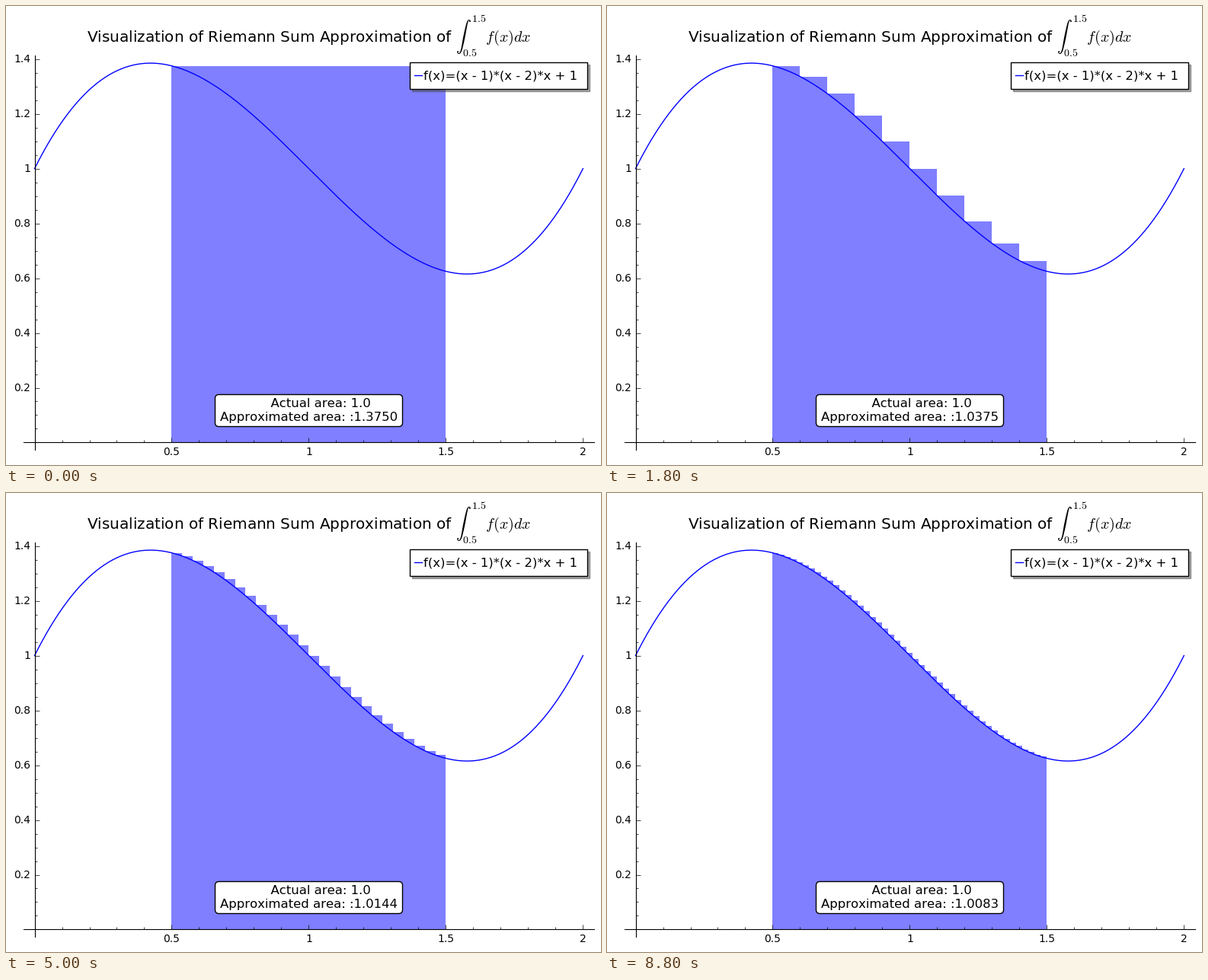
These frames come from a looping animation (781x603 px, 9 s). A matplotlib script:

```python
import numpy as np
import matplotlib.pyplot as plt
from matplotlib.animation import FuncAnimation
from matplotlib.markers import TICKRIGHT, TICKUP
from matplotlib.patches import FancyBboxPatch, Rectangle, Shadow

W, H, DPI = 781, 603, 100
X0, Y0, UNIT = 37.525, 573.483, 359.9  # origin in pixels, pixels per unit
LEFT, RIGHT = 0.5, 1.5
STEPS, INTERVAL = 45, 200
TITLE_SIZE, TEXT_SIZE, TICK_SIZE = 14.4, 11.87, 10
TICK_PAD = 5.56

plt.rcParams.update({
    "font.family": "DejaVu Sans",
    "mathtext.fontset": "cm",
    "text.kerning_factor": 6,
})


def f(x):
    return (x - 1) * (x - 2) * x + 1


def at(px, py):
    """Data coordinates of a pixel counted from the top left."""
    return (px - X0) / UNIT, (Y0 - py) / UNIT


def label(px, py, text, size, **kw):
    kw.setdefault("va", "baseline")
    return ax.text(*at(px, py), text, fontsize=size, **kw)


def ticks(xs, ys, marker, size):
    ax.plot(xs, ys, ls="none", marker=marker, ms=size, mew=0.5,
            color="black", zorder=3)


def riemann(n):
    """Left-hand heights, bar edges and total area for n bars."""
    edges = np.linspace(LEFT, RIGHT, n + 1)
    heights = f(edges[:-1])
    return heights, edges, heights.mean() * (RIGHT - LEFT)


def area_text(area):
    return f"      Actual area: 1.0\nApproximated area: :{area:.4f}"


fig = plt.figure(figsize=(W / DPI, H / DPI), dpi=DPI, facecolor="white")
ax = fig.add_axes([0, 0, 1, 1])
ax.axis("off")
(x_min, y_max), (x_max, y_min) = at(0, 0), at(W, H)
ax.set(xlim=(x_min, x_max), ylim=(y_min, y_max))
ax.set_autoscale_on(False)

# Bars and curve
heights, edges, area = riemann(1)
bars = ax.stairs(heights, edges, fill=True, color="blue", alpha=0.5, lw=0,
                 zorder=1)
xs = np.linspace(0, 2, 400)
ax.plot(xs, f(xs), color="blue", lw=1, zorder=2)

# Axis lines, ticks and tick labels
for ends in ((at(23, Y0), at(772, Y0)), (at(X0, 65), at(X0, 583))):
    ax.plot(*zip(*ends), color="black", lw=0.8, solid_capstyle="projecting",
            zorder=3)

x_major = np.arange(1, 5) * 0.5
y_major = np.arange(1, 8) * 0.2
x_minor = [k * 0.1 for k in range(1, 20) if k % 5]
y_minor = [k * 0.05 for k in range(1, 28) if k % 4]
for marks, size in ((x_major, 4), (x_minor, 2)):
    ticks(marks, np.zeros(len(marks)), TICKUP, size)
for marks, size in ((y_major, 4), (y_minor, 2)):
    ticks(np.zeros(len(marks)), marks, TICKRIGHT, size)
for x in x_major:
    label(X0 + x * UNIT, Y0 + TICK_PAD, f"{x:g}", TICK_SIZE,
          ha="center", va="top")
for y in y_major:
    label(X0 - TICK_PAD, Y0 - y * UNIT, f"{y:.2g}", TICK_SIZE,
          ha="right", va="center")

label(397.5, 48, "Visualization of Riemann Sum Approximation of "
      r"$\int_{0.5}^{1.5}f(x)dx$", TITLE_SIZE, ha="center")

# Legend
frame = Rectangle(at(530, 109), 233 / UNIT, 35 / UNIT, fc="white",
                  ec="black", lw=1, zorder=5)
ax.add_patch(frame)
ax.add_patch(Shadow(frame, 2 / UNIT, -2 / UNIT, zorder=4))
ax.plot(*zip(at(536, 91), at(546, 91)), color="blue", lw=1, zorder=6)
label(548, 96, "f(x)=(x - 1)*(x - 2)*x + 1", TEXT_SIZE, zorder=6)

# Note with both areas
pad = 5 / UNIT
ax.add_patch(FancyBboxPatch(
    at(279.5, 547.5), 236 / UNIT, 32 / UNIT, fc="white", ec="black", lw=1,
    boxstyle=f"round,pad={pad},rounding_size={pad}", zorder=5))
note = label(397.5, 531.5, area_text(area), TEXT_SIZE, ha="center",
             va="center", multialignment="center", zorder=6)


def draw(i):
    heights, edges, area = riemann(i + 1)
    bars.set_data(heights, edges)
    note.set_text(area_text(area))
    return bars, note


anim = FuncAnimation(fig, draw, frames=STEPS, interval=INTERVAL, repeat=True,
                     repeat_delay=0)
plt.show()
```
